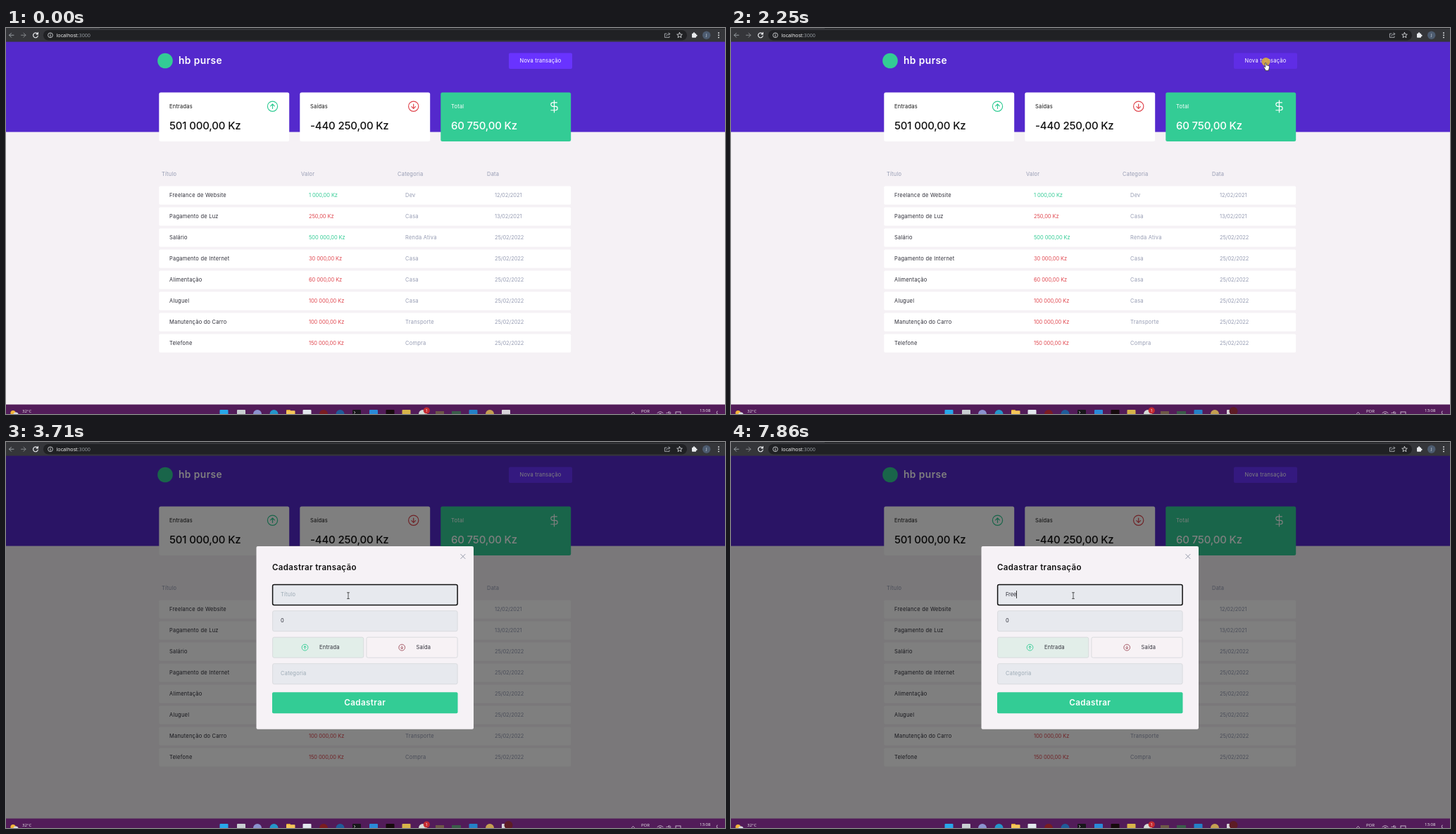
Animation, 1021 px wide and 548 px high, one loop 8 s. Source, as an HTML page:

```html
<!DOCTYPE html>
<html lang="pt">
<head>
<meta charset="utf-8">
<title>Finanças</title>
<style>
  html, body { margin: 0; width: 100%; height: 100%; overflow: hidden; background: #f5f1f5; }
  svg { display: block; width: 1021px; height: 548px; }
  text { font-family: Inter, "Open Sans", sans-serif; font-size: 7.5px; letter-spacing: .03em; }
  text.num { letter-spacing: -.012em; }
  text.sys { font-family: "Open Sans", "Noto Sans", sans-serif; letter-spacing: 0; }
</style>
</head>
<body>
<svg id="stage" viewBox="0 0 1021 548" xmlns="http://www.w3.org/2000/svg"></svg>
<script>
const LOOP = 8000;
const GREEN = '#33cc95', RED = '#e0474f', MUTED = '#969cb3', INK = '#2e2e38';

const attrs = o => Object.entries(o).map(([k, v]) => ` ${k}="${v}"`).join('');
const rect = (x, y, w, h, fill, more = {}) =>
  `<rect${attrs({ x, y, width: w, height: h, fill, ...more })}/>`;
const circle = (cx, cy, r, fill, more = {}) => `<circle${attrs({ cx, cy, r, fill, ...more })}/>`;
const line = (d, stroke, width = 1, more = {}) =>
  `<path${attrs({ d, fill: 'none', stroke, 'stroke-width': width, 'stroke-linecap': 'round', 'stroke-linejoin': 'round', ...more })}/>`;
const text = (x, y, str, fill, more = {}) => `<text${attrs({ x, y, fill, ...more })}>${str}</text>`;
const group = (id, body, more = {}) => `<g${attrs({ id, ...more })}>${body}</g>`;

// Circled arrow: dir is -1 for up, 1 for down.
const arrowIcon = (x, y, r, dir, color, width) =>
  circle(x, y, r, 'none', { stroke: color, 'stroke-width': width }) +
  line(`M${x} ${y - dir * r * .45}v${dir * r * .9}m${-r * .4} ${-dir * r * .4}l${r * .4} ${dir * r * .4}l${r * .4} ${-dir * r * .4}`, color, width);

function browserBar() {
  const light = '#e8eaed', grey = '#9aa0a6';
  return rect(0, 0, 1021, 19.6, '#35363a') +
    rect(133, 0, 888, 1, '#202124') +
    rect(53, 3, 914, 14.5, '#202124', { rx: 7.2 }) +
    line('M11 10.2H4.5M7.5 7.2l-3 3 3 3', grey) +
    line('M21.5 10.2H28M25 7.2l3 3-3 3', '#85888c') +
    line('M44.6 8.2a3.4 3.4 0 1 0 .7 2.8M45.4 6.4v2.4h-2.4', light, 1.2) +
    circle(63, 10.2, 3.4, 'none', { stroke: light, 'stroke-width': .8 }) +
    line('M63 10v2M63 8.4v.1', light, .9) +
    `<text class="sys" x="71.5" y="12.8" fill="#fff" style="font-size:7.2px">localhost<tspan fill="${grey}">:3000</tspan></text>` +
    line('M938 8h-2.6v5.4h6.6v-1.6M938 11.4c.3-2 1.6-3 4.4-3M941 6.6l1.8 1.8-1.8 1.8', '#bdc1c6', .8) +
    line('M956.5 6.4l1.1 2.5 2.7.2-2.1 1.8.7 2.7-2.4-1.5-2.4 1.5.7-2.7-2.1-1.8 2.7-.2z', light, .8) +
    rect(974, 7.8, 6, 6, light, { rx: .8 }) + circle(977, 7.6, 1.3, light) + circle(980.3, 10.8, 1.3, light) +
    circle(994.7, 10.2, 5.7, '#4d5c70') +
    text(994.7, 12.4, 'J', '#e4e8ee', { class: 'sys', 'text-anchor': 'middle', style: 'font-size:6px' }) +
    [7, 10.2, 13.4].map(y => circle(1012, y, .9, light)).join('');
}

function card(x, label, value, fill, ink, icon) {
  return rect(x + .3, 91.6, 184.9, 69.3, fill, { rx: 2.5 }) +
    text(x + 15, 114, label, ink) +
    text(x + 15, 143.5, value, ink, { class: 'num', style: 'font-size:15px', 'font-weight': 500 }) + icon;
}

function tableRows() {
  const rows = [
    ['Freelance de Website', '1 000,00', 'Dev', '12/02/2021', 1],
    ['Pagamento de Luz', '250,00', 'Casa', '13/02/2021'],
    ['Salário', '500 000,00', 'Renda Ativa', '25/02/2022', 1],
    ['Pagamento de Internet', '30 000,00', 'Casa', '25/02/2022'],
    ['Alimentação', '60 000,00', 'Casa', '25/02/2022'],
    ['Aluguel', '100 000,00', 'Casa', '25/02/2022'],
    ['Manutenção do Carro', '100 000,00', 'Transporte', '25/02/2022'],
    ['Telefone', '150 000,00', 'Compra', '25/02/2022'],
  ];
  return rows.map(([title, value, kind, date, income], i) => {
    const y = 224.5 + i * 30, base = y + 15.8;
    return rect(217.3, y, 584.9, 26.3, '#fff', { rx: 1.8 }) +
      text(232, base, title, INK) +
      text(430, base, value + ' Kz', income ? GREEN : RED, { class: 'num' }) +
      text(567, base, kind, MUTED) +
      text(694, base, date, MUTED, { class: 'num' });
  }).join('');
}

function page() {
  const dollar = line('M12 1v22M17 5H9.5a3.5 3.5 0 0 0 0 7h5a3.5 3.5 0 0 1 0 7H6', '#fff', 1.5,
    { transform: 'translate(769.2 102) scale(.775)' });
  const heads = [[221, 'Título'], [419, 'Valor'], [556, 'Categoria'], [683, 'Data']];
  return rect(0, 19, 1021, 516, '#f5f1f5') +
    rect(0, 19, 1021, 128.6, '#5429cc') +
    circle(226, 46.5, 10.8, GREEN) +
    text(245, 51, 'hb purse', '#fff', { style: 'font-size:13.8px', 'font-weight': 600 }) +
    rect(714, 35.5, 90, 22.5, '#6933ff', { id: 'newButton', rx: 2 }) +
    text(759, 49.3, 'Nova transação', '#fff', { 'text-anchor': 'middle' }) +
    card(217, 'Entradas', '501 000,00 Kz', '#fff', '#111', arrowIcon(378.5, 111.2, 7.1, -1, GREEN, 1.2)) +
    card(417, 'Saídas', '-440 250,00 Kz', '#fff', '#111', arrowIcon(578.7, 111.2, 7.1, 1, RED, 1.2)) +
    card(617, 'Total', '60 750,00 Kz', GREEN, '#fff', dollar) +
    heads.map(([x, s]) => text(x, 210.3, s, MUTED)).join('') + tableRows();
}

function modal() {
  const box = (x, y, w, fill, id = 'box' + x + y) =>
    rect(x, y, w, 29, fill, { id, rx: 2.2, stroke: '#d4d6da', 'stroke-width': .8 });
  const hint = '#9ba9b4', field = '#e7e9ee';
  const bold = size => ({ style: `font-size:${size}px`, 'font-weight': 600 });
  return rect(0, 19, 1021, 516, '#000', { opacity: .5 }) +
    rect(355.5, 148, 308.5, 259.7, '#f6f2f6', { rx: 2 }) +
    line('M645.8 159.4l6.2 6.2M652 159.4l-6.2 6.2', '#969cab', 1) +
    text(378, 182.3, 'Cadastrar transação', '#111', bold(11.5)) +
    box(378.6, 202.4, 262.5, field, 'titleField') +
    text(390, 218.8, 'Título', hint, { id: 'placeholder' }) +
    text(390, 218.8, '', INK, { id: 'typed', class: 'num' }) +
    rect(390, 211, .8, 11, '#111', { id: 'caret' }) +
    box(378.6, 239.7, 262.5, field) + text(390, 256.3, '0', INK) +
    box(378.6, 277.2, 129.2, '#e2eee9') + arrowIcon(424.5, 291.7, 4.4, -1, GREEN, .9) + text(445, 294.2, 'Entrada', INK) +
    box(511.9, 277.2, 129.2, '#f7f2f5') + arrowIcon(562.2, 291.7, 4.4, 1, '#a0505c', .9) + text(582.5, 294.2, 'Saída', INK) +
    box(378.6, 314.7, 262.5, field) + text(390, 331.3, 'Categoria', hint) +
    rect(378, 355.3, 263.5, 30, GREEN, { rx: 2 }) +
    text(509.8, 374.2, 'Cadastrar', '#fff', { ...bold(11.7), 'text-anchor': 'middle' });
}

function taskbar() {
  const small = { class: 'sys', style: 'font-size:6px' };
  const square = (x, fill) => rect(x - 6, 542, 12, 7, fill, { rx: 1 });
  const disc = (x, fill) => circle(x, 548, 6, fill);
  const tray = '#dcd3df';
  return rect(0, 534.5, 1021, 14, '#521c59') +
    circle(10, 546.5, 3.6, '#f2b53a') + circle(14, 549, 3.6, '#d9dce4') +
    text(23, 546, '32°C', '#eee', small) +
    square(309.5, '#28a8ea') + square(334, '#c9cfd2') + disc(357, '#8b93cf') + disc(380.5, '#2496c9') +
    rect(398, 542, 6, 3, '#e0a42e', { rx: 1 }) + rect(398, 543.3, 12.5, 6, '#f5c75a', { rx: .8 }) +
    square(427.5, '#e3e8ee') + disc(451, '#7a1c20') + disc(474.5, '#1f5c99') +
    square(498, '#17171a') + line('M494.5 544.5l1.5 1.3-1.5 1.3', '#ddd', .8) +
    square(522, '#2a8ad8') + square(545.5, '#160b0d') + square(568.5, '#d7b44a') +
    disc(592, '#d5ddd8') + circle(597.3, 543, 4.6, '#c52c32') +
    text(597.3, 545.3, '1', '#fff', { ...small, 'text-anchor': 'middle' }) +
    rect(610, 544, 12, 5, '#6d5847') + rect(633, 544, 13, 5, '#3a5c49') +
    square(663.5, '#2481c7') + disc(687, '#c4a051') + square(710, '#d8d5da') +
    circle(713.5, 544, 6, '#5d1c25', { id: 'recording' }) +
    line('M888.5 547.5l2-2 2 2', tray, .8) +
    text(902, 546, 'POR', '#eee', small) +
    line('M925 546.5q4-3.6 8 0M926.6 548.2q2.4-2 4.8 0', tray, .8) +
    line('M938 546.4h1.5l2-1.8v5M943.2 545q1.5 1.5 0 3.5', tray, .8) +
    rect(951, 545, 7, 4, 'none', { stroke: tray, 'stroke-width': .8 }) +
    text(985, 545.4, '13:08', '#eee', small) +
    line('M1010 544q-2.2 3 1.5 5', tray, .9);
}

function pointers() {
  const outline = { fill: '#fff' };
  return circle(759, 47.8, 6, '#d9aa3c', { id: 'click', opacity: .9 }) +
    group('pointer',
      line('M0 0v8.8l2.1-1.9 1.4 3.1 1.5-.7-1.4-3h2.8z', '#222', .7, { ...outline, id: 'arrow' }) +
      line('M-.8 1v5.8l-1.4-1q-1-.2-1 .8l2.4 3.4v1.6h4.8v-1.4q1.2-1.8 1-4.8-.2-1-1.2-.6-.4-1-1.4-.4-.4-.9-1.5-.4V1Q0-.4-.8 1z', '#222', .7, { ...outline, id: 'hand' }) +
      line('M-1.5-4.2h3M0-4.2v8.6M-1.5 4.4h3', '#333', .8, { id: 'beam' }));
}

const stage = document.getElementById('stage');
stage.innerHTML = page() + group('modal', modal()) + browserBar() + taskbar() + pointers();

const el = id => document.getElementById(id);
const show = (id, on) => el(id).setAttribute('visibility', on ? 'inherit' : 'hidden');
const within = (t, a, b) => t >= a && t < b;

const pointerPath = [
  [0, 714, 562], [67, 712, 550], [500, 655, 440], [871, 604, 316], [1072, 587, 191],
  [1340, 650, 118], [1675, 792, 54], [1876, 774, 50], [2110, 759.5, 49], [2320, 759.5, 49],
  [2500, 715, 84], [2750, 600, 166], [2990, 510, 211], [3180, 486, 218],
];
const typing = [[0, ''], [4370, 'F'], [5120, 'Fr'], [5320, 'Fre'], [5520, 'Free'], [5720, 'Freen'], [7390, 'Free']];
const caretOn = [[3180, 3710], [4240, 4920], [5120, 6250], [6780, 7330], [7860, LOOP]];

function pointerAt(t) {
  const next = pointerPath.findIndex(p => p[0] > t);
  if (next < 0) return pointerPath.at(-1).slice(1);
  const [t0, x0, y0] = pointerPath[next - 1], [t1, x1, y1] = pointerPath[next];
  const k = (t - t0) / (t1 - t0);
  return [x0 + (x1 - x0) * k, y0 + (y1 - y0) * k];
}

function draw(t) {
  const open = t >= 2320, focused = t >= 3180;
  const [x, y] = pointerAt(Math.floor(t / 67) * 67);
  const overButton = !open && x > 714 && x < 804 && y > 35 && y < 58;
  const overField = open && x > 378 && x < 642 && y > 202 && y < 232;

  el('pointer').setAttribute('transform', `translate(${x} ${y})`);
  show('hand', overButton);
  show('beam', overField);
  show('arrow', !overButton && !overField);
  show('click', within(t, 2250, 2320) || within(t, 3180, 3310));
  el('click').setAttribute('cx', x);
  el('click').setAttribute('cy', y - 1);
  el('newButton').setAttribute('fill', overButton ? '#5f2de5' : '#6933ff');

  show('recording', t >= 70);
  show('modal', open);
  const field = el('titleField');
  field.setAttribute('stroke', focused ? '#111' : '#d4d6da');
  field.setAttribute('stroke-width', focused ? 1.5 : .8);

  const typed = typing.findLast(k => k[0] <= t)[1];
  el('typed').textContent = typed;
  show('placeholder', !typed);
  el('caret').setAttribute('x', 390 + (typed ? el('typed').getComputedTextLength() - .3 : 0));
  show('caret', caretOn.some(([a, b]) => within(t, a, b)));
}

function tick() {
  draw(performance.now() % LOOP);
  requestAnimationFrame(tick);
}
tick();
</script>
</body>
</html>
```
